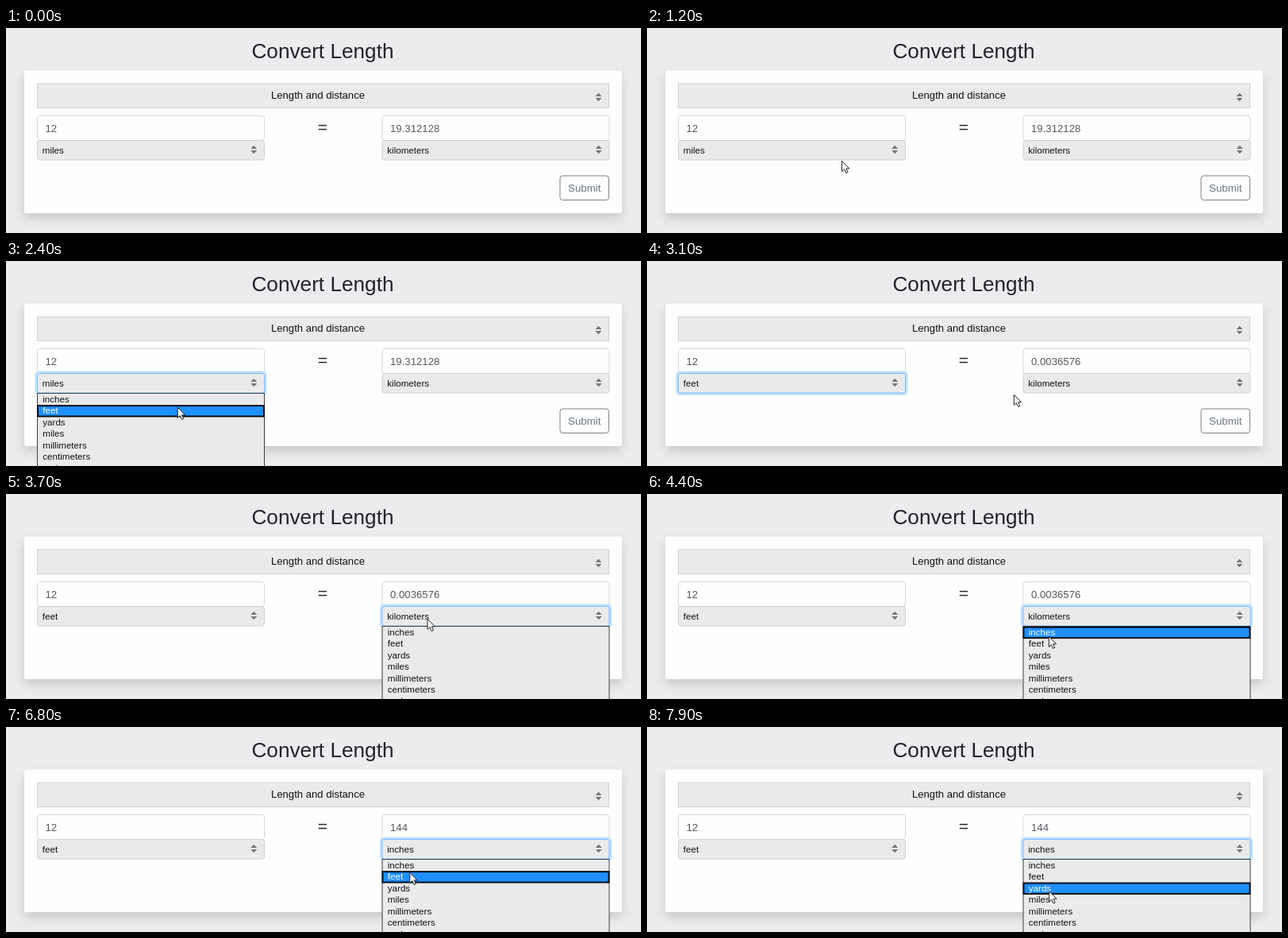
Animation of 800 by 258 pixels, one loop 8 s. Source, as an HTML page:

```html
<!DOCTYPE html>
<html lang="en">
<head>
<meta charset="utf-8">
<title>Convert Length</title>
<style>
html, body { margin: 0; width: 100%; height: 100%; overflow: hidden; background: #ecebed; }
svg { display: block; width: 800px; height: 258px; }
text { font-family: "Liberation Sans", Arial, sans-serif; white-space: pre; }
.title { font-size: 26.2px; fill: #212529; }
.body { font-size: 13.1px; fill: #111; }
.value { font-size: 13.2px; fill: #55595e; }
.small { font-size: 11.6px; fill: #111; }
.equals { font-size: 21px; fill: #212529; }
.button { font-size: 13.3px; fill: #6c757d; }
.mid { text-anchor: middle; }
</style>
</head>
<body>
<svg id="stage" viewBox="0 0 800 258">
  <defs>
    <filter id="shadow" x="-10%" y="-20%" width="120%" height="150%">
      <feDropShadow dx="0" dy="6.5" stdDeviation="6.5" flood-color="#000" flood-opacity=".15"/>
    </filter>
  </defs>
  <rect width="800" height="258" fill="#ecebed"/>
  <text class="title mid" x="399" y="38">Convert Length</text>
  <rect x="23" y="53.5" width="753" height="179.5" rx="3" fill="#fefefe" filter="url(#shadow)"/>
  <rect x="39.5" y="70" width="720" height="30.5" fill="#ebeaeb" stroke="#cfd1d4"/>
  <text class="body mid" x="393" y="89.3">Length and distance</text>
  <text class="equals mid" x="399" y="132">=</text>
  <rect x="698" y="186" width="61.5" height="30.5" rx="3.3" fill="#fefefe" stroke="#7b838a"/>
  <text class="button mid" x="728.8" y="205.6">Submit</text>
</svg>
<script>
const NS = "http://www.w3.org/2000/svg";
const stage = document.getElementById("stage");
const LOOP = 8000, STEP = 100;
const LIST_TOP = 167, ROW = 14.4, WIDTH = 286;
const UNITS = ["inches", "feet", "yards", "miles", "millimeters", "centimeters", "meters", "kilometers"];

function add(parent, tag, attrs, content = "") {
  const el = document.createElementNS(NS, tag);
  for (const key in attrs) el.setAttribute(key, attrs[key]);
  el.textContent = content;
  return parent.appendChild(el);
}

function show(el, on) {
  el.setAttribute("visibility", on ? "visible" : "hidden");
}

function addArrows(x, y) {
  add(stage, "path", {
    d: `M${x - 4} ${y - 1}l4 -4.3 4 4.3zM${x - 4} ${y + 1}l4 4.3 4 -4.3z`,
    fill: "#75787b"
  });
}

function makeField(x) {
  add(stage, "rect", { x, y: 110.5, width: WIDTH, height: 31, rx: 3, fill: "#fefefe", stroke: "#d3d7dc" });
  const value = add(stage, "text", { class: "value", x: x + 10, y: 131 });
  const glow = add(stage, "rect", {
    x: x - 1.5, y: 140, width: WIDTH + 3, height: 27.5, rx: 4,
    fill: "none", stroke: "#bfdeff", "stroke-width": 3
  });
  const box = add(stage, "rect", { x, y: 141.5, width: WIDTH, height: 24.5, rx: 3, fill: "#ebeaeb" });
  const unit = add(stage, "text", { class: "small", x: x + 6.3, y: 157.5 });
  addArrows(x + 272.7, 153);
  return { x, value, glow, box, unit };
}

function makeList(x) {
  const group = add(stage, "g", {});
  add(group, "rect", { x, y: 166.5, width: WIDTH, height: 125, fill: "#ebeaeb", stroke: "#3c3e40" });
  const bar = add(group, "rect", {
    x: x + 0.5, width: WIDTH - 1, height: ROW - 1,
    fill: "#1e90ff", stroke: "#0a0f18", "stroke-width": 2
  });
  const rows = UNITS.map((name, i) =>
    add(group, "text", { class: "small", x: x + 6.8, y: 178 + i * ROW }, name));
  return { group, bar, rows };
}

addArrows(746.5, 87);
const left = makeField(39.5), right = makeField(474);
left.list = makeList(left.x);
right.list = makeList(right.x);
const cursor = add(stage, "path", {
  d: "M.3 .3V13.4L3.3 10.6 5.5 15.4 7.7 14.4 5.6 9.8H9.6Z",
  fill: "#fff", stroke: "#222", "stroke-width": 1
});

// Pointer stops: time, x, y
const PATH = [
  [400, 287, 264], [1300, 242, 159.5], [1400, 242, 160], [1700, 218, 177],
  [2000, 216, 184], [2700, 216, 184], [3100, 462, 168], [3500, 533, 155],
  [3600, 533, 155], [4400, 506, 179], [4900, 506, 179], [5300, 507, 177],
  [5600, 507, 177], [6200, 511, 158.5], [6400, 511, 159], [6800, 508.5, 183],
  [7200, 508, 219], [7400, 508, 219], [7900, 506.5, 206.5]
];

function pointerAt(t) {
  if (t <= PATH[0][0]) return PATH[0].slice(1);
  const i = PATH.findIndex(p => p[0] >= t);
  const [t0, x0, y0] = PATH[i - 1], [t1, x1, y1] = PATH[i];
  const u = (t - t0) / (t1 - t0);
  const k = u * u * (3 - 2 * u) * 0.5 + u * 0.5;
  return [x0 + (x1 - x0) * k, y0 + (y1 - y0) * k];
}

function update(field, state, y) {
  const { value, unit, focus, open } = state;
  field.value.textContent = value;
  field.unit.textContent = unit;
  show(field.glow, focus);
  field.box.setAttribute("stroke", focus ? "#80bdff" : "#cdd0d4");
  show(field.list.group, open);
  // Before the pointer reaches the list, the chosen unit is lit.
  const lit = y < LIST_TOP ? UNITS.indexOf(unit) : Math.floor((y - LIST_TOP) / ROW);
  field.list.bar.setAttribute("y", LIST_TOP + 0.7 + lit * ROW);
  field.list.rows.forEach((row, i) => { row.style.fill = i === lit ? "#fff" : "#111"; });
}

function render(time) {
  const t = Math.floor((time % LOOP) / STEP) * STEP;
  const between = (a, b) => t >= a && t < b;
  const [x, y] = pointerAt(t);
  update(left, {
    value: "12",
    unit: t < 2700 ? "miles" : "feet",
    focus: between(1400, 3600),
    open: between(1400, 2700)
  }, y);
  update(right, {
    value: t < 2700 ? "19.312128" : t < 4900 ? "0.0036576" : "144",
    unit: t < 4900 ? "kilometers" : "inches",
    focus: t >= 3600,
    open: between(3600, 4900) || t >= 6400
  }, y);
  show(cursor, t >= 500);
  cursor.setAttribute("transform", `translate(${x} ${y})`);
}

let start;
function frame(now) {
  start ??= now;
  render(now - start);
  requestAnimationFrame(frame);
}
render(0);
requestAnimationFrame(frame);
</script>
</body>
</html>
```
